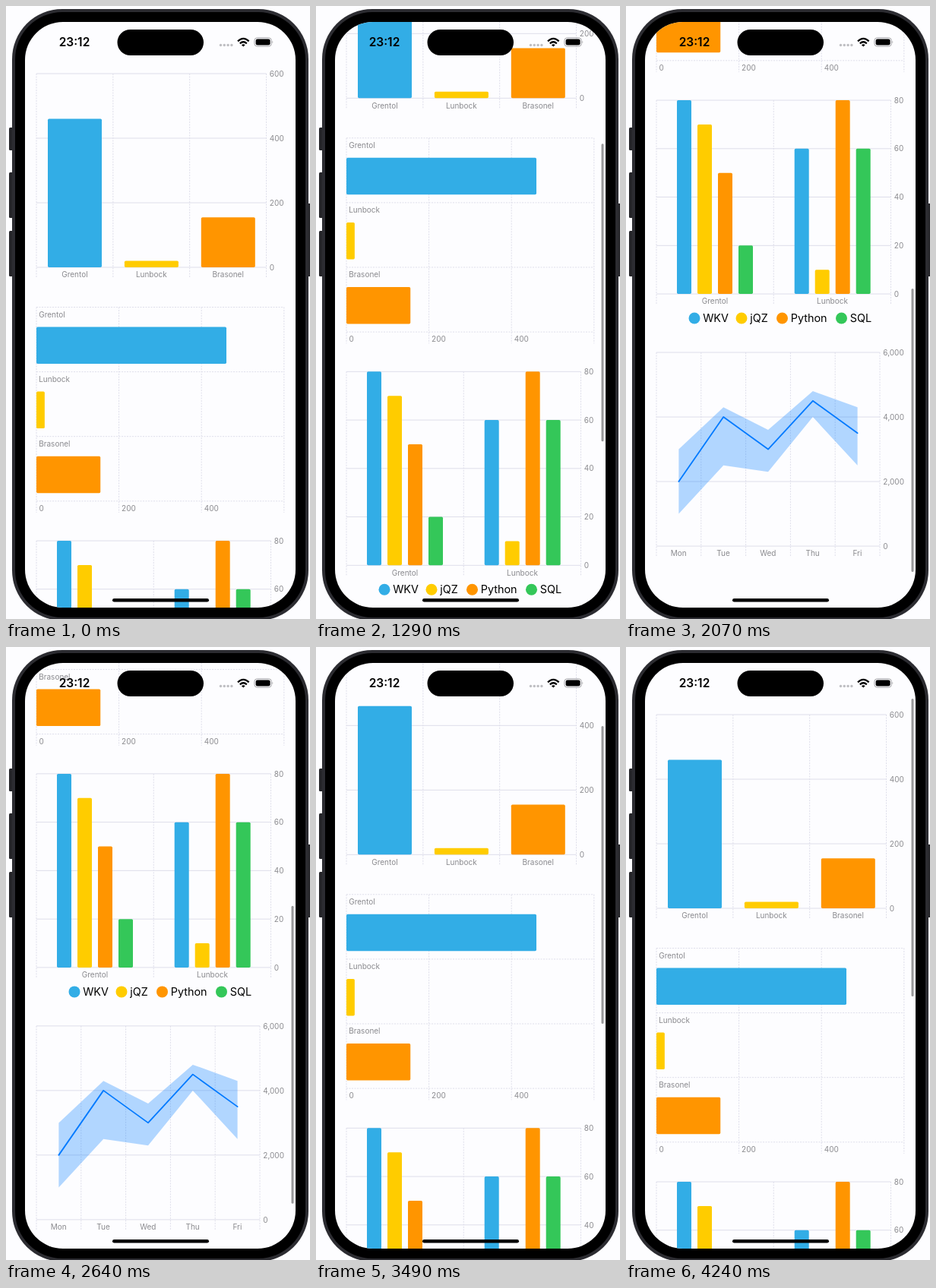
Animation of 400x807 px, one loop 4.27 s. Source, as an HTML page:

```html
<!DOCTYPE html>
<html lang="en">
<head>
<meta charset="utf-8">
<title>Charts</title>
<style>
  html, body { margin: 0; width: 100%; height: 100%; overflow: hidden; background: #fdfdff; }
  svg { display: block; width: 400px; height: 807px; font-family: Inter, sans-serif; }
  .label { font-size: 10px; fill: #8a8a8e; }
  .legend { font-size: 14.4px; fill: #000; }
  .grid { stroke: #dedeea; stroke-width: 1; }
  .dashed { stroke-dasharray: 2 1.5; }
</style>
</head>
<body>
<svg viewBox="0 0 400 807">
  <defs><clipPath id="screen"><rect x="25" y="21" width="356" height="771" rx="50"/></clipPath></defs>
  <g fill="#26262a">
    <rect x="4" y="160" width="8" height="30" rx="1.5"/>
    <rect x="4" y="219" width="8" height="60" rx="1.5"/>
    <rect x="4" y="296" width="8" height="60" rx="1.5"/>
    <rect x="394" y="260" width="8" height="96" rx="1.5"/>
  </g>
  <rect x="8" y="4" width="390" height="805" rx="66" fill="#2c2c31"/>
  <rect x="12" y="8" width="382" height="797" rx="62"/>
  <rect x="25" y="21" width="356" height="771" rx="50" fill="#fdfdff"/>
  <g clip-path="url(#screen)">
    <g id="page"></g>
    <rect id="bar" x="375.5" width="3" rx="1.5" fill="#000" fill-opacity=".4"/>
  </g>
  <rect x="146.5" y="31" width="113.5" height="34" rx="17"/>
  <text x="90" y="53" text-anchor="middle" font-size="15.5" font-weight="600">23:12</text>
  <g fill="#bebec2">
    <circle cx="282.5" cy="51.5" r="1.7"/><circle cx="287.3" cy="51.5" r="1.7"/>
    <circle cx="292.1" cy="51.5" r="1.7"/><circle cx="296.9" cy="51.5" r="1.7"/>
  </g>
  <g fill="none" stroke="#000" stroke-width="2.3">
    <path d="M305 46.4Q312.3 39.4 319.6 46.4"/>
    <path d="M307.8 49.3Q312.3 45.2 316.8 49.3"/>
    <path d="M312.3 53.6L309.9 51.2Q312.3 49.4 314.7 51.2Z" fill="#000" stroke="none"/>
  </g>
  <rect x="326.9" y="41.9" width="22.4" height="11.2" rx="3.6" fill="none" stroke="#a4a4a8"/>
  <rect x="328.6" y="43.6" width="19" height="7.8" rx="2.2"/>
  <path d="M350.5 45.8q1.7 1.7 0 3.4z" fill="#a4a4a8"/>
  <rect x="140" y="780" width="127" height="4.6" rx="2.3"/>
</svg>
<script>
const BLUE = '#32ade6', YELLOW = '#ffcc00', ORANGE = '#ff9500', GREEN = '#34c759';
const names = ['Grentol', 'Lunbock', 'Brasonel'];
const weights = [460, 20, 155];
const colors = [BLUE, YELLOW, ORANGE, GREEN];
const parts = [];

const rect = (x, y, w, h, fill) =>
  parts.push(`<rect x="${x}" y="${y}" width="${w}" height="${h}" rx="1.7" fill="${fill}"/>`);
const text = (s, x, y, anchor = 'start', cls = 'label') =>
  parts.push(`<text class="${cls}" x="${x}" y="${y}" text-anchor="${anchor}">${s}</text>`);
const hline = (y, x2, cls = '') =>
  parts.push(`<path class="grid ${cls}" d="M40 ${y}H${x2}"/>`);
const vline = (x, y1, y2) =>
  parts.push(`<path class="grid dashed" d="M${x} ${y1}V${y2}"/>`);

// Grid with a value axis on the right and equal columns below it
function frame(top, right, columns, ticks) {
  const step = 255 / (ticks.length - 1);
  ticks.forEach((tick, i) => {
    hline(top + i * step, right);
    text(tick, right + 4.3, top + i * step + 3.7);
  });
  for (let i = 0; i <= columns; i++) vline(40 + (right - 40) * i / columns, top, top + 269.5);
}

function columnChart() {
  frame(89, 342.5, 3, ['600', '400', '200', '0']);
  names.forEach((name, i) => {
    const x = 55 + i * 100.9, h = weights[i] * 0.425;
    rect(x, 344 - h, 71, h, colors[i]);
    text(name, x + 35.4, 357.3, 'middle');
  });
}

function rowChart() {
  for (let i = 0; i < 4; i++) {
    hline(396.5 + i * 85.1, 366, 'dashed');
    vline(40 + i * 108.6, 396.5, 667);
    if (i < 3) text(i * 200, 43.5 + i * 108.6, 665);
  }
  names.forEach((name, i) => {
    const y = 422.5 + i * 85.1;
    rect(40, y, weights[i] * 0.5435, 48.5, colors[i]);
    text(name, 43.2, y - 12.7);
  });
}

function groupChart() {
  frame(704, 348.5, 2, ['80', '60', '40', '20', '0']);
  [[80, 70, 50, 20], [60, 10, 80, 60]].forEach((group, g) => {
    group.forEach((v, i) =>
      rect(67 + g * 154.7 + i * 27, 959 - v * 3.1875, 19, v * 3.1875, colors[i]));
    text(names[g], 117 + g * 154.5, 972.4, 'middle');
  });
  ['WKV', 'jQZ', 'Python', 'SQL'].forEach((name, i) => {
    const x = [90, 152, 205.5, 283.5][i];
    parts.push(`<circle cx="${x}" cy="991" r="7.5" fill="${colors[i]}"/>`);
    text(name, x + 11.2, 996.2, 'start', 'legend');
  });
}

function rangeChart() {
  frame(1036, 334, 5, ['6,000', '4,000', '2,000', '0']);
  const points = values => values.map((v, i) => [69.4 + i * 58.8, 1291 - v * 42.5]);
  const high = points([3, 4.3, 3.6, 4.8, 4.3]);
  const low = points([1, 2.5, 2.3, 4, 2.5]);
  const mid = points([2, 4, 3, 4.5, 3.5]);
  parts.push(`<polygon points="${[...high, ...low.reverse()].join(' ')}" fill="#007aff" fill-opacity=".3"/>`);
  parts.push(`<polyline points="${mid.join(' ')}" fill="none" stroke="#007aff" stroke-width="1.8" stroke-linejoin="round" stroke-linecap="round"/>`);
  ['Mon', 'Tue', 'Wed', 'Thu', 'Fri'].forEach((day, i) =>
    text(day, 69.2 + i * 58.8, 1303.8, 'middle'));
}

columnChart();
rowChart();
groupChart();
rangeChart();
const page = document.getElementById('page');
const bar = document.getElementById('bar');
page.innerHTML = parts.join('');

// Scroll path as [ms, offset]: flick down, bounce, flick back up, small bounce
const LOOP = 4270, START = 980, MAX = 561;
const path = [[0, 0], [START, 0], [1100, 55], [1250, 185], [1400, 322], [1550, 431], [1700, 510],
  [1850, 561], [1970, 581], [2070, 580], [2220, 567], [2400, 561], [2550, 555], [2700, 518],
  [2850, 438], [3000, 330], [3150, 222], [3320, 134], [3490, 71], [3640, 30], [3796, 0],
  [3896, -6], [4050, -4], [4240, 0], [LOOP, 0]];

function slope(i) {
  if (i < 2 || i >= path.length - 2) return 0;
  const [a, b] = [path[i - 1], path[i + 1]];
  return (b[1] - a[1]) / (b[0] - a[0]);
}

function scrollAt(t) {
  let i = 0;
  while (i < path.length - 2 && t >= path[i + 1][0]) i++;
  const [t0, y0] = path[i], [t1, y1] = path[i + 1];
  const d = t1 - t0, u = (t - t0) / d, v = 1 - u;
  return v * v * (1 + 2 * u) * y0 + u * u * (3 - 2 * u) * y1
    + d * u * v * (v * slope(i) - u * slope(i + 1));
}

function draw(now) {
  const t = now % LOOP, offset = scrollAt(t);
  page.setAttribute('transform', `translate(0 ${-offset})`);
  // The indicator shrinks against the end it is pulled past
  const inside = Math.min(MAX, Math.max(0, offset));
  const over = offset - inside;
  bar.setAttribute('y', 68 + inside * 0.508 + Math.max(0, over));
  bar.setAttribute('height', 392 - Math.abs(over));
  bar.setAttribute('opacity', Math.min(1, Math.max(0, (t - START) / 100)));
}

const start = performance.now();
function tick() {
  draw(performance.now() - start);
  requestAnimationFrame(tick);
}
tick();
</script>
</body>
</html>
```
